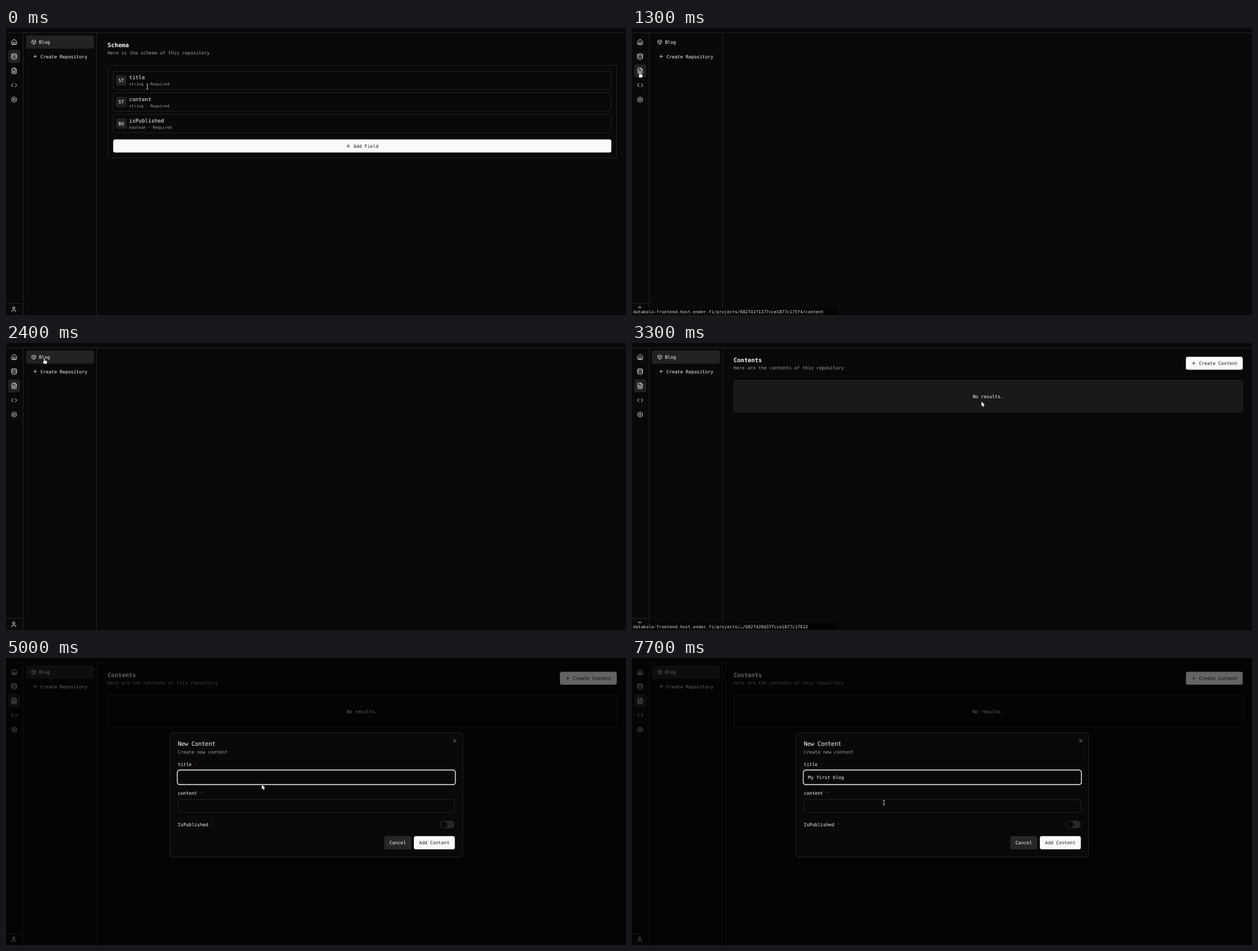
An HTML page for the animation above (8000 ms loop, 1099x510 px).

```html
<!DOCTYPE html>
<html lang="en">
<head>
<meta charset="utf-8">
<title>Content manager</title>
<style>
  html, body { margin: 0; width: 100%; height: 100%; overflow: hidden; background: #09090b; }
  svg { display: block; }
  text { font-family: "DejaVu Sans Mono", monospace; text-rendering: geometricPrecision; white-space: pre; }
</style>
</head>
<body>
<svg id="stage" width="1099" height="510" viewBox="0 0 1099 510"></svg>
<script>
const LOOP = 8000, STEP = 100;
const BG = '#09090b', LINE = '#242427', FILL = '#222225', WHITE = '#fafafa', GREY = '#a1a1aa', DARK = '#18181b';
const SM = 8.14; // base text size

const gear = Array.from({ length: 48 }, (_, i) => {
  const a = i * Math.PI / 24, r = 8.7 + 1.2 * Math.cos(6 * a);
  return (12 + r * Math.sin(a)).toFixed(2) + ' ' + (12 - r * Math.cos(a)).toFixed(2);
}).join('L');

const ICONS = {
  home: 'M15 21v-8a1 1 0 0 0-1-1h-4a1 1 0 0 0-1 1v8M3 10a2 2 0 0 1 .7-1.5l7-6a2 2 0 0 1 2.6 0l7 6A2 2 0 0 1 21 10v9a2 2 0 0 1-2 2H5a2 2 0 0 1-2-2z',
  data: 'M3 5a9 3 0 1 0 18 0a9 3 0 1 0-18 0V19A9 3 0 0 0 21 19V5M3 12A9 3 0 0 0 21 12',
  file: 'M15 2H6a2 2 0 0 0-2 2v16a2 2 0 0 0 2 2h12a2 2 0 0 0 2-2V7ZM14 2v4a2 2 0 0 0 2 2h4M10 9H8M16 13H8M16 17H8',
  code: 'm16 18 6-6-6-6M8 6l-6 6 6 6',
  gear: `M${gear}ZM9 12a3 3 0 1 0 6 0a3 3 0 1 0-6 0`,
  user: 'M19 21v-2a4 4 0 0 0-4-4H9a4 4 0 0 0-4 4v2M8 7a4 4 0 1 0 8 0a4 4 0 1 0-8 0',
  box: 'M21 8a2 2 0 0 0-1-1.7l-7-4a2 2 0 0 0-2 0l-7 4A2 2 0 0 0 3 8v8a2 2 0 0 0 1 1.7l7 4a2 2 0 0 0 2 0l7-4A2 2 0 0 0 21 16ZM3.3 7l8.7 5 8.7-5M12 22V12',
  plus: 'M5 12h14M12 5v14',
  close: 'M18 6 6 18M6 6l12 12'
};

const icon = (name, cx, cy, size = 9.3, color = WHITE) =>
  `<path d="${ICONS[name]}" transform="translate(${cx - size / 2} ${cy - size / 2}) scale(${size / 24})"
    fill="none" stroke="${color}" stroke-width="2" stroke-linecap="round" stroke-linejoin="round"/>`;
const text = (str, x, y, color = WHITE, size = SM, attrs = '') =>
  `<text x="${x}" y="${y}" fill="${color}" font-size="${size}" ${attrs}>${str}</text>`;
const mid = (str, x, y, color) => text(str, x, y, color, SM, 'text-anchor="middle"');
// Rectangle given by its edges
const rect = (x1, y1, x2, y2, fill, stroke = 'none', r = 3.5, attrs = '') =>
  `<rect x="${x1}" y="${y1}" width="${x2 - x1}" height="${y2 - y1}" rx="${r}" fill="${fill}" stroke="${stroke}" ${attrs}/>`;
const line = d => `<path d="${d}" stroke="${LINE}" fill="none"/>`;
const group = (id, body) => `<g id="${id}">${body}</g>`;

const heading = (title, sub) =>
  text(title, 180, 33.6, WHITE, 10.47, 'font-weight="bold"') + text(sub, 180, 47, GREY);

const field = ([name, type], i) => {
  const y = 76.5 + i * 38.4;
  return rect(190, y, 1072.5, y + 33, 'none', LINE) +
    rect(195, y + 7.2, 213.5, y + 25.7, FILL) +
    mid(type.slice(0, 2).toUpperCase(), 204.2, y + 19.5) +
    text(name, 218.3, y + 14.8, WHITE, 9.3) +
    text(type + ' · Required', 218.3, y + 25.9, GREY, 6.98);
};

const label = (name, y) => text(`${name} <tspan fill="#82181a">*</tspan>`, 304.5, y);

const sidebar =
  line('M0 8.5H1099M30.5 9V510M160.5 9V510M0 489.5H30') +
  rect(4, 39, 25, 62, FILL, 'none', 3.5, 'id="dataOn"') +
  rect(4, 64.5, 25, 87.5, FILL, 'none', 3.5, 'id="fileOn"') +
  ['home', 'data', 'file', 'code', 'gear'].map((n, i) => icon(n, 14.4, 25 + i * 25.55, 11.6)).join('') +
  icon('user', 13.8, 500, 11.6) +
  rect(35.3, 13.3, 156, 36.7, FILL, 'none', 3.5, 'id="blogOn"') +
  icon('box', 49.2, 25) + text('Blog', 58.4, 28) +
  icon('plus', 51.7, 50.5) + text('Create Repository', 61, 53.5);

const schema = heading('Schema', 'Here is the schema of this repository') +
  rect(180.5, 66.5, 1082.5, 231, 'none', LINE) +
  [['title', 'string'], ['content', 'string'], ['isPublished', 'boolean']].map(field).join('') +
  rect(190, 198, 1073, 221.3, WHITE) +
  icon('plus', 606.7, 209.8, 9.3, DARK) + text('Add Field', 616, 212.8, DARK);

const contents = heading('Contents', 'Here are the contents of this repository') +
  rect(981.8, 24.4, 1082.6, 47.6, WHITE, 'none', 3.5, 'id="create"') +
  icon('plus', 995.7, 36, 9.3, DARK) + text('Create Content', 1005, 39, DARK) +
  rect(180.5, 66.5, 1082.5, 123, 'none', LINE, 3.5, 'id="table"') +
  mid('No results.', 630.8, 97.8);

const dialog =
  rect(290.5, 132.8, 809.5, 353.8, BG, LINE, 5) +
  text('New Content', 304.5, 155.8, WHITE, 10.47, 'letter-spacing="-.26"') +
  text('Create new content', 304.5, 169.7, GREY) +
  icon('close', 795.4, 147, 9.3, '#b4b4b6') +
  label('title', 191.6) +
  rect(303.6, 199, 796.6, 225, BG, WHITE, 4.5, 'stroke-width="1.4"') +
  rect(305, 200.4, 795.2, 223.6, 'none', LINE) +
  text('', 312, 215, WHITE, SM, 'id="typed"') +
  rect(0, 207, .7, 217, WHITE, 'none', 0, 'id="caret"') +
  label('content', 242.9) +
  rect(304.9, 251.7, 795.4, 274.5, 'none', LINE) +
  label('IsPublished', 298.6) +
  rect(769.5, 289, 795.5, 302.6, '#27272a', 'none', 6.8) +
  `<circle cx="776.6" cy="295.8" r="5.8" fill="${BG}"/>` +
  rect(670.6, 316.6, 718.3, 340, '#27272a') + mid('Cancel', 694.4, 331.2) +
  rect(723, 316.6, 795.6, 340, WHITE) + mid('Add Content', 759.2, 331.2, DARK);

const status = rect(0, 498, 365, 510, '#040405', 'none', 0) + text('', 1.8, 507.2, '#dedee0', 7.7, 'id="url"');

// Pointer shapes, with the hot spot at 0,0
const pointers =
  '<path id="arrow" d="M0 0V8.4L1.9 6.7 3.3 9.8 4.7 9.2 3.4 6.2H6Z" fill="#fff" stroke="#000" stroke-width=".7" paint-order="stroke"/>' +
  '<path id="hand" d="M-.8 .2Q0-.9 .8 .2V3.2L4 3.9Q5 4.2 4.8 5.4L4 9H-.6L-2.8 5.8Q-2.6 4.6-.8 5.8Z" fill="#fff" stroke="#000" stroke-width=".7" paint-order="stroke"/>' +
  '<g id="beam" fill="none"><path d="M-1.7-4H1.7M0-4V4M-1.7 4H1.7" stroke="#000" stroke-width="2"/>' +
  '<path d="M-1.6-4H1.6M0-4V4M-1.6 4H1.6" stroke="#fff" stroke-width=".8"/></g>';

document.getElementById('stage').innerHTML =
  sidebar + group('schema', schema) + group('contents', contents) + group('status', status) +
  rect(0, 0, 1099, 510, '#000', 'none', 0, 'id="dim"') + group('dialog', dialog) + group('pointer', pointers);

const $ = id => document.getElementById(id);
const show = (id, on) => $(id).setAttribute('visibility', on ? 'visible' : 'hidden');
const set = (id, name, value) => $(id).setAttribute(name, value);

// Piecewise linear value; each key is [time, value, ...]
function track(keys, t, k = 1) {
  const i = keys.findIndex(key => key[0] > t);
  if (i < 0) return keys[keys.length - 1][k];
  if (i === 0) return keys[0][k];
  const a = keys[i - 1], b = keys[i];
  return a[k] + (b[k] - a[k]) * (t - a[0]) / (b[0] - a[0]);
}

const PATH = [[0, 250.5, 104], [700, 17, 81], [800, 14, 79], [1300, 14, 79], [1800, 212, 108], [2100, 130, 50],
  [2400, 68, 28], [2800, 68, 28], [3300, 619.5, 104], [3700, 1003, 49], [4000, 1005.5, 31], [4200, 1005.5, 31],
  [5000, 453.5, 225], [7500, 453.5, 225], [7700, 446.5, 257]];
const STATUS = [[600, 0], [800, .55], [900, .9], [1000, .9], [1100, 1], [1600, 1], [1800, .55], [2000, 0],
  [2500, 0], [2700, 1], [3400, 1], [3600, 0]];
const TYPING = [[5800, 0], [5900, 1], [6000, 1], [6100, 2], [6200, 2], [6700, 9], [6800, 9], [7100, 13]];
const HOST = 'datakolo-frontend.host.ender.fi/projects/';

function draw(t) {
  const within = (a, b) => t >= a && t < b;
  const x = track(PATH, t), y = track(PATH, t, 2);

  show('dataOn', t < 1300);
  show('fileOn', t >= 700);
  show('blogOn', t < 1300 || t >= 2300);
  show('schema', t < 1300);
  show('contents', t >= 2600);
  set('create', 'fill', within(3800, 4200) ? '#e2e2e3' : WHITE);
  set('table', 'fill', t < 4200 && x > 180 && y > 67 ? '#19191b' : 'none');

  set('status', 'opacity', track(STATUS, t));
  $('url').textContent = HOST + (t < 2300 ? '682741f1377cce1877c175f4/content' : '…/6827420d377cce1877c17612');

  const p = 1 - (1 - Math.min(1, Math.max(0, (t - 4100) / 175))) ** 3;
  const scale = .95 + .05 * p;
  set('dim', 'opacity', .6 * p);
  set('dialog', 'opacity', p);
  set('dialog', 'transform', `translate(550 243.3) scale(${scale}) translate(-550 -243.3)`);

  const count = Math.round(track(TYPING, t));
  $('typed').textContent = 'My first blog'.slice(0, count);
  set('caret', 'x', 312.2 + count * SM * .602);
  show('caret', within(4200, 4900) || within(5400, 7600));

  const shape = t < 200 || t >= 7700 ? 'beam'
    : within(700, 1400) || within(2200, 2900) || within(3800, 4200) ? 'hand' : 'arrow';
  for (const id of ['arrow', 'hand', 'beam']) show(id, id === shape);
  set('pointer', 'transform', `translate(${x} ${y})`);
}

const start = performance.now();
function tick() {
  const t = (performance.now() - start) % LOOP;
  draw(Math.floor(t / STEP) * STEP); // the screen updates ten times a second
  requestAnimationFrame(tick);
}
tick();
</script>
</body>
</html>
```
